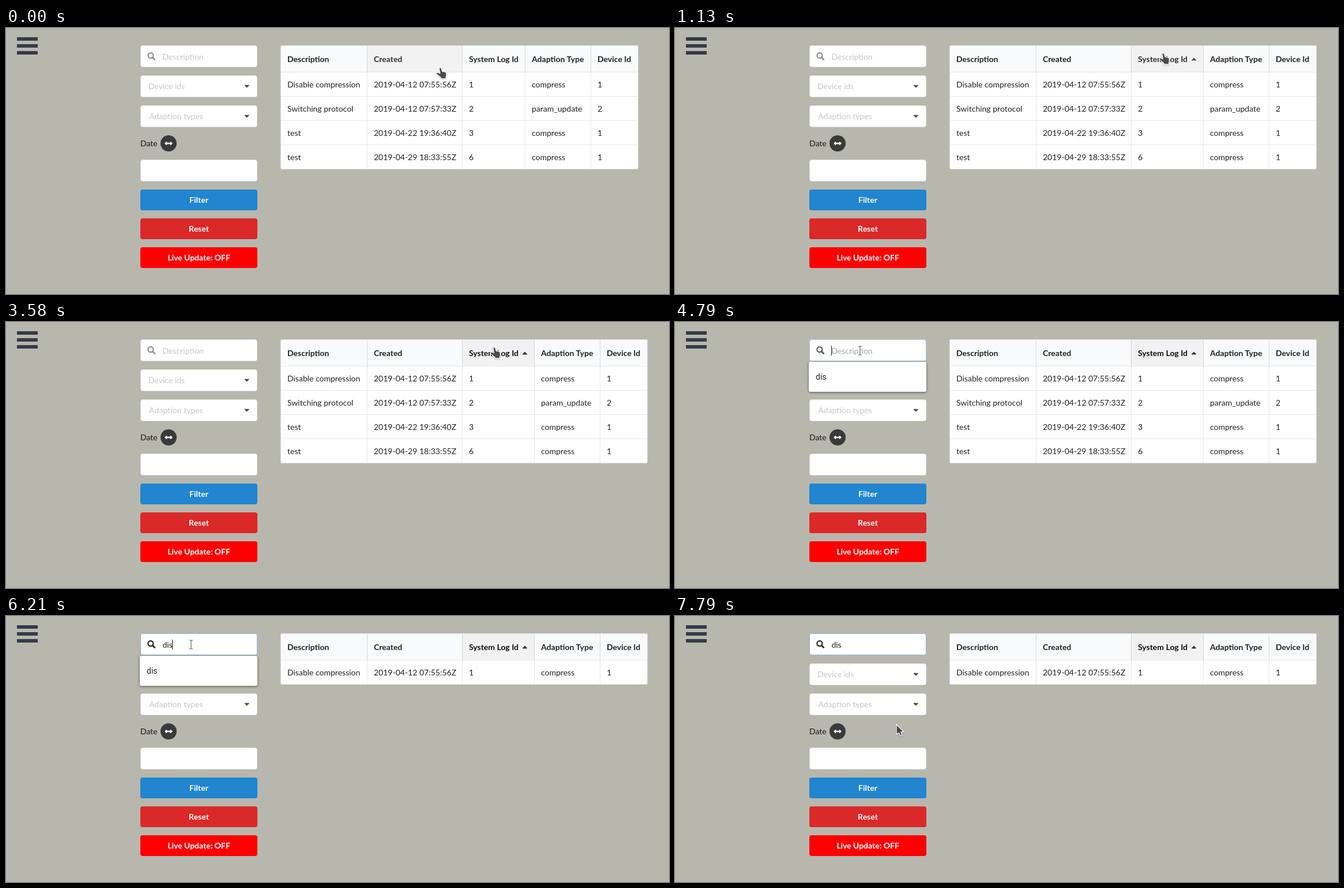
Write an HTML page that moves like this. It is 1150 px wide and 461 px high and loops after 8 s.

```html
<!DOCTYPE html>
<html lang="en">
<head>
<meta charset="utf-8">
<title>System log table</title>
<style>
  html, body { margin: 0; width: 100%; height: 100%; overflow: hidden; background: #b8b7ad; }
  svg { display: block; width: 1150px; height: 461px; font: 14px Lato, sans-serif; }
  text { fill: rgba(0, 0, 0, .87); white-space: pre; }
  .bold { font-weight: 700; }
  .hint { fill: #c7c7c7; }
  .white { fill: #fff; }
  .cursor { fill: #4a4a4a; stroke: #fff; stroke-width: 1.2; stroke-linejoin: round;
    filter: drop-shadow(0 1px 1px rgba(0, 0, 0, .25)); }
  .popup { filter: drop-shadow(0 1px 2px rgba(0, 0, 0, .55)); }
</style>
</head>
<body>
<svg id="stage" viewBox="0 0 1150 461">
  <defs><clipPath id="tableClip"><rect id="clipRect" x="476" y="30" rx="4"/></clipPath></defs>
  <g id="panel"></g>
  <g id="search"></g>
  <g id="table"></g>
  <g id="popup"></g>
  <g id="cursor"></g>
</svg>
<script>
const LOOP = 8000;
const LINE = 'rgba(34,36,38,.1)', EDGE = '#dededf';
const $ = id => document.getElementById(id);

const rect = (x, y, w, h, fill, extra = '') =>
  `<rect x="${x}" y="${y}" width="${w}" height="${h}" fill="${fill}" ${extra}/>`;
const text = (x, y, s, cls = '', extra = '') =>
  `<text x="${x}" y="${y}" class="${cls}" ${extra}>${s}</text>`;
const box = (y, border = EDGE) =>
  rect(233.5, y + .5, 202, 37, '#fff', `rx="3.5" stroke="${border}"`);
const button = (y, label, fill) =>
  rect(233, y, 203, 36, fill, 'rx="4"') +
  text(334.5, y + 23, label, 'bold white', 'text-anchor="middle"');

// Rounded triangle centred on x, y; dir 1 points down, -1 up
const triangle = (x, y, dir, alpha = .7) =>
  `<path transform="translate(${x} ${y}) scale(1 ${dir})" fill="rgba(0,0,0,${alpha})"
    d="M-3.6 -2.3H3.6Q4.6 -2 3.9 -1.2L.6 2.1Q0 2.6 -.6 2.1L-3.9 -1.2Q-4.6 -2 -3.6 -2.3Z"/>`;

function drawPanel(hoverTypes) {
  const bars = [16, 28, 40].map(y => rect(19, y, 36, 6, '#373a47')).join('');
  return bars +
    box(82) + text(247, 106, 'Device ids', 'hint') + triangle(417.7, 101, 1) +
    box(134, hoverTypes ? '#c0c0c1' : EDGE) +
    text(248.3, 158, 'Adaption types', 'hint') + triangle(417.7, 153, 1) +
    text(233, 205, 'Date') +
    '<circle cx="282" cy="200" r="14" fill="#3a3a3a"/>' +
    `<path d="M275.6 200l3-3v2.2h6.8V197l3 3-3 3v-2.2h-6.8V203z"
      fill="#fff" stroke="#fff" stroke-width="1" stroke-linejoin="round"/>` +
    box(228) +
    button(280, 'Filter', '#2185d0') +
    button(330, 'Reset', '#db2828') +
    button(380, 'Live Update: OFF', '#f00');
}

function drawSearch({ focus, typed, caretX }) {
  const border = [EDGE, '#b1cadb', '#85b7d9'][focus];
  const ink = ['#909090', '#585858', '#212121'][focus];
  const hint = ['#c7c7c7', '#a6a6a6', '#858585'][focus];
  return box(30, border) +
    `<g fill="none" stroke="${ink}"><circle cx="250.9" cy="47.7" r="4.5" stroke-width="2.2"/>
     <path d="M254.5 51.3l3.3 3.3" stroke-width="2.7" stroke-linecap="round"/></g>` +
    (typed ? text(271.4, 55, typed) : text(271.4, 55, 'Description', '', `style="fill:${hint}"`)) +
    (caretX ? rect(caretX, 41, 1, 17, '#111') : '');
}

const HEADS = ['Description', 'Created', 'System Log Id', 'Adaption Type', 'Device Id'];
const ROWS = [
  ['Disable compression', '2019-04-12 07:55:56Z', 1, 'compress', 1],
  ['Switching protocol', '2019-04-12 07:57:33Z', 2, 'param_update', 2],
  ['test', '2019-04-22 19:36:40Z', 3, 'compress', 1],
  ['test', '2019-04-29 18:33:55Z', 6, 'compress', 1],
];

function drawTable({ sort, hover, sortInk, filtered }) {
  const shift = sort ? 16 : 0;
  const cols = [476, 626, 791, 900 + shift, 1014 + shift, 1096 + shift];
  const rows = filtered ? ROWS.slice(0, 1) : sort < 0 ? [...ROWS].reverse() : ROWS;
  const w = cols[5] + 1 - 476, h = 47 + 42 * rows.length;
  $('clipRect').setAttribute('width', w);
  $('clipRect').setAttribute('height', h);

  let out = rect(476, 30, w, h, '#fff') + rect(476, 30, w, 46, '#f9fafb');
  HEADS.forEach((head, i) => {
    const x = cols[i], sorted = sort && i === 2, over = i === hover;
    if (sorted || over) out += rect(x, 30, cols[i + 1] - x, 46, '#f2f2f2');
    if (i) out += rect(x, 31, 1, 46, 'rgba(34,36,38,.15)') + rect(x, 77, 1, h - 48, LINE);
    const ink = sorted ? sortInk : over ? .8 : .87;
    out += text(x + 12, 59, head, 'bold', `style="fill:rgba(0,0,0,${ink})"`);
    if (sorted) out += triangle(900, 54.2, -sort, ink * .8);
    rows.forEach((row, r) => out += text(x + 12, 103 + 42 * r, row[i]));
  });
  out += rect(476, 76, w, 1, LINE);
  for (let r = 1; r < rows.length; r++) out += rect(476, 76 + 42 * r, w, 1, LINE);
  return `<g clip-path="url(#tableClip)">${out}</g>` +
    rect(476.5, 30.5, w - 1, h - 1, 'none', `rx="3.5" stroke="${EDGE}"`);
}

const drawPopup = alpha => alpha
  ? `<g opacity="${alpha}">${rect(232, 69, 204, 52, '#fff', 'rx="3" class="popup"')}` +
    text(244, 100, 'dis', '', 'style="font-family:Roboto,sans-serif"') + '</g>'
  : '';

const SHAPES = {
  hand: `<path class="cursor" d="M-2.2 1.6Q-.6 -1 1.6 1.2L3.2 6.6 7.8 7.4Q10.4 8 10.4 10.6V14.5
    L9.6 17V19.4H.8V17.4L-6.4 11.4Q-7.6 9.8 -6.2 8.8 -4.6 8.2 -3 9.2L-.6 10.2Z"/>`,
  arrow: '<path class="cursor" d="M0 0V17.4L4 14.4 7 19.8 10.2 18.4 7.8 13.2 12.6 12.2Z"/>',
  beam: `<g fill="none"><path d="M-3 -7.5H3M0 -7.5V7.5M-3 7.5H3" stroke="#fff" stroke-width="3"/>
    <path d="M-2.8 -7.5H-.8L0 -6.7 .8 -7.5H2.8M0 -6.7V6.7M-2.8 7.5H-.8L0 6.7 .8 7.5H2.8"
      stroke="#444"/></g>`,
};

function cursorAt(t) {
  if (t < 500) {
    const step = t < 250 ? 0 : Math.floor((t - 250) / 41.7) + 1;
    const p = Math.min(1, step / 7), e = p * p * (3 - 2 * p);
    return ['hand', 753.5 + 93.5 * e, 68.5 - 25 * e];
  }
  if (t < 3790) return ['hand', 847, 43.5];
  if (t < 4040) return ['hand', 750.5, 37];
  if (t < 4330) return ['arrow', 320.5, 43.5];
  if (t < 7540) return ['beam', 321, 49.5];
  if (t < 7790) return ['arrow', 381, 180.5];
  return ['arrow', 384, 188];
}

// Last value whose start time has passed
const pick = (t, steps) => steps.reduce((v, [at, next]) => t >= at ? next : v, steps[0][1]);

const last = {};
function put(id, html) {
  if (last[id] !== html) $(id).innerHTML = last[id] = html;
}

function render(t) {
  const [shape, x, y] = cursorAt(t);
  put('panel', drawPanel(t >= 7540 && t < 7790));
  put('search', drawSearch({
    focus: pick(t, [[0, 0], [4790, 1], [5040, 2]]),
    typed: pick(t, [[0, ''], [5540, 'di'], [5790, 'dis']]),
    caretX: pick(t, [[0, 0], [4790, 271], [5040, 0], [5540, 282], [5790, 288],
      [6420, 0], [6880, 288], [7540, 0]]),
  }));
  put('table', drawTable({
    sort: pick(t, [[0, 0], [1130, 1], [2170, -1], [3580, 1]]),
    hover: t >= 3790 ? -1 : x > 791 ? 2 : 1,
    sortInk: pick(t, [[0, .8], [1170, .87], [1670, .95]]),
    filtered: t >= 6210,
  }));
  put('popup', drawPopup(pick(t, [[0, 0], [4790, 1], [7080, .35], [7330, 0]])));
  put('cursor', `<g transform="translate(${x} ${y})">${SHAPES[shape]}</g>`);
}

const start = performance.now();
function tick(now) {
  render(Math.max(0, now - start) % LOOP);
  requestAnimationFrame(tick);
}
render(0);
requestAnimationFrame(tick);
</script>
</body>
</html>
```
